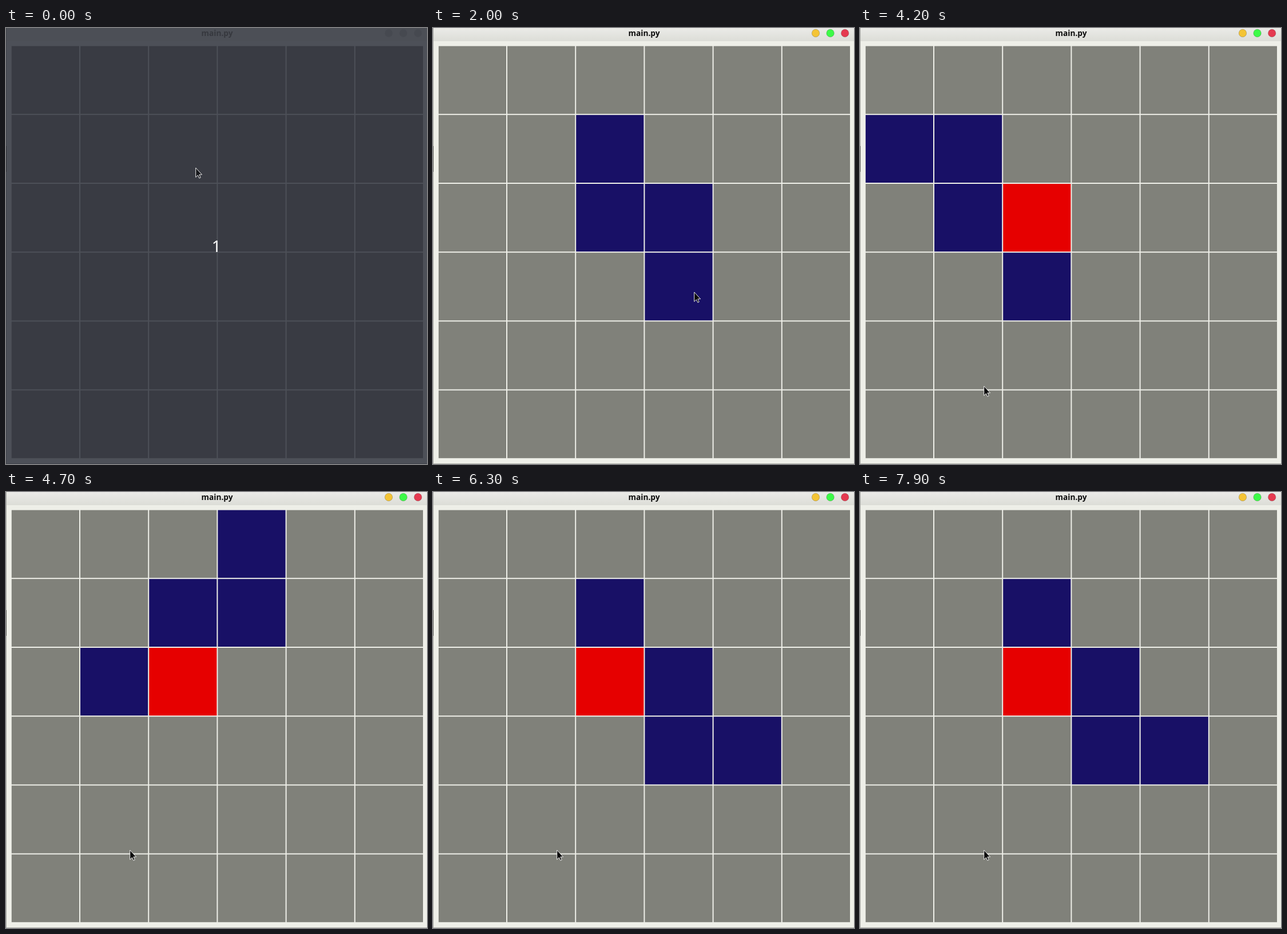
An HTML page that plays this animation: 736x761 px, repeating every 8000 ms.

```html
<!DOCTYPE html>
<html lang="en">
<head>
<meta charset="utf-8">
<title>main.py</title>
<style>
  html, body { margin: 0; width: 100%; height: 100%; overflow: hidden; background: #eeefe8; }
  svg {
    display: block; width: 736px; height: 761px;
    --frame: #eeefe8; --bar-top: #ebebe8; --bar-bottom: #dcddd7; --ink: #0c0c0c; --edge: #a9aaa6; --notch: #5c5d5a;
    --cell: #80817a; --min: #f4c435; --max: #3dfa48; --close: #e53a50; --rim: #0003; --arrow: #0a0a0a;
  }
  svg.idle {
    --bar-top: #e3e4de; --bar-bottom: #e3e4de; --ink: #8b8c88;
    --min: #c7c8c4; --max: #c7c8c4; --close: #c7c8c4; --rim: #0000;
  }
  svg.dim {
    --frame: #4d5058; --bar-top: #4c4f56; --bar-bottom: #4c4f56; --ink: #36383e; --edge: #3f4249; --notch: #2c2e34;
    --cell: #393b43; --min: #464950; --max: #464950; --close: #464950; --rim: #0000; --arrow: #17181c;
  }
  #count { display: none; fill: #fff; font: 28px "Noto Sans", sans-serif; }
  .dim #count { display: inline; }
  #title { fill: var(--ink); font: bold 13.7px "Open Sans", "Noto Sans", sans-serif; text-anchor: middle; }
  circle { stroke: var(--rim); }
  #cells rect { fill: var(--cell); }
  #cells .on { fill: #181066; }
  #cells .pivot { fill: #e60000; }
</style>
</head>
<body>
<svg id="stage" class="dim" viewBox="0 0 736 761">
  <defs>
    <linearGradient id="bar" x2="0" y2="1">
      <stop stop-color="var(--bar-top)"/>
      <stop offset="1" stop-color="var(--bar-bottom)"/>
    </linearGradient>
  </defs>
  <rect width="736" height="761" fill="var(--frame)"/>
  <rect width="736" height="23" fill="url(#bar)"/>
  <rect width="1" height="761" fill="var(--edge)"/>
  <rect y="206" width="1" height="45" fill="var(--notch)"/>
  <rect y="760" width="736" height="1" fill="var(--edge)"/>
  <text id="title" x="369" y="14">main.py</text>
  <circle cx="669" cy="9" r="6.7" fill="var(--min)"/>
  <circle cx="694.6" cy="9" r="6.7" fill="var(--max)"/>
  <circle cx="720.2" cy="9" r="6.7" fill="var(--close)"/>
  <g id="cells"></g>
  <text id="count" x="359.7" y="391">1</text>
  <path id="cursor" d="M.7 1V17.5L4.4 14L6.9 19.2L9.2 18.1L6.9 12.9H11.6Z" fill="var(--arrow)" stroke="#fff" stroke-width=".9"/>
</svg>
<script>
const LOOP = 8000, STEP = 100;
const SIZE = 6, LEFT = 9.8, TOP = 31.6, PITCH = 120.2, SIDE = 118.2;
const stage = document.getElementById('stage');
const group = document.getElementById('cells');
const cursor = document.getElementById('cursor');

const cells = Array.from({ length: SIZE * SIZE }, (_, i) => {
  const cell = document.createElementNS('http://www.w3.org/2000/svg', 'rect');
  cell.setAttribute('x', LEFT + PITCH * (i % SIZE));
  cell.setAttribute('y', TOP + PITCH * Math.floor(i / SIZE));
  cell.setAttribute('width', SIDE);
  cell.setAttribute('height', SIDE);
  group.append(cell);
  return cell;
});

// The pointer glides to each stop and clicks the cell under it
const stops = [
  { leave: 0, arrive: 0, x: 331, y: 243, click: 500 },
  { leave: 600, arrive: 700, x: 319, y: 340, click: 900 },
  { leave: 1100, arrive: 1200, x: 457, y: 355, click: 1300 },
  { leave: 1600, arrive: 1700, x: 456, y: 460, click: 2000 },
  { leave: 2100, arrive: 2200, x: 516, y: 459, click: 2200 },
  { leave: 2600, arrive: 2800, x: 327, y: 367, click: 3000 },
  { leave: 3200, arrive: 3300, x: 216, y: 624 }
];

const cellAt = ({ x, y }) => ({
  row: Math.floor((y - TOP) / PITCH),
  col: Math.floor((x - LEFT) / PITCH)
});
const clicks = stops.filter(stop => stop.click).map(stop => ({ at: stop.click, ...cellAt(stop) }));
const pivot = clicks.pop();

// Five quarter turns, each following a little sooner than the last
const burst = (start, pace) => Array.from({ length: 5 }, (_, n) =>
  start + Math.round((pace * n - 27 * n * n) / STEP) * STEP);
const clockwise = burst(3700, 540);
const counter = burst(6300, 510);

const countPast = (times, t) => times.filter(at => t >= at).length;
const ease = p => p * p * (3 - 2 * p);

function rotate(row, col, quarters) {
  for (let i = 0; i < quarters; i++) [row, col] = [col, -row];
  return [row, col];
}

function drawCells(t) {
  const quarters = (countPast(clockwise, t) - countPast(counter, t)) % 4;
  const state = Array(cells.length).fill('');
  const mark = (row, col, name) => { state[row * SIZE + col] = name; };
  for (const { at, row, col } of clicks) {
    if (t < at) continue;
    const [r, c] = rotate(row - pivot.row, col - pivot.col, quarters);
    mark(pivot.row + r, pivot.col + c, 'on');
  }
  if (t >= pivot.at) mark(pivot.row, pivot.col, 'pivot');
  cells.forEach((cell, i) => cell.setAttribute('class', state[i]));
}

function drawCursor(t) {
  const index = stops.findLastIndex(stop => t >= stop.leave);
  const to = stops[index], from = stops[index - 1] || to;
  const p = ease(Math.min(1, (t - to.leave + STEP) / (to.arrive - to.leave + STEP)));
  const x = from.x + (to.x - from.x) * p;
  const y = from.y + (to.y - from.y) * p;
  cursor.setAttribute('transform', `translate(${Math.round(x)} ${Math.round(y)})`);
}

function draw(time) {
  const t = Math.floor(time / STEP) * STEP;
  stage.setAttribute('class', t < 400 ? 'dim' : t < clicks[0].at ? 'idle' : '');
  drawCells(t);
  drawCursor(t);
}

const start = performance.now();
function tick() {
  draw((performance.now() - start) % LOOP);
  requestAnimationFrame(tick);
}
tick();
</script>
</body>
</html>
```
